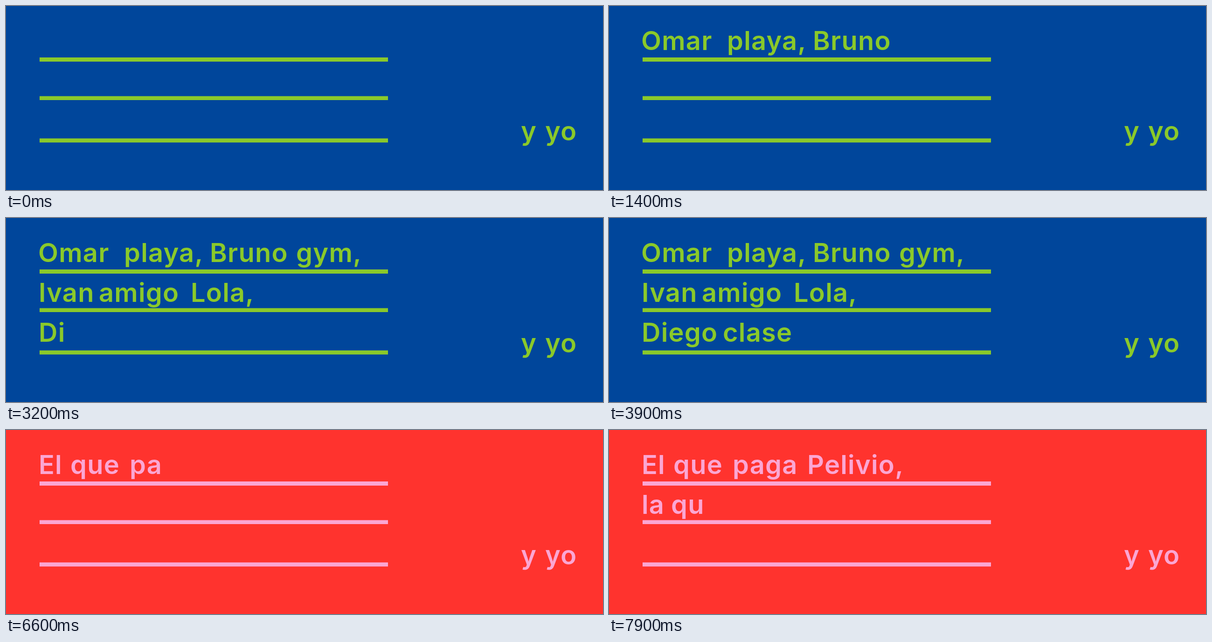
Write an HTML page that moves like this. It is 1280 px wide and 397 px high and loops after 8000 ms.

```html
<!DOCTYPE html>
<html lang="es">
<head>
<meta charset="utf-8">
<title>Lista</title>
<style>
  html, body { margin: 0; width: 100%; height: 100%; overflow: hidden; }
  svg { display: block; width: 100%; height: 100%; fill: currentColor; }
  text { font: 600 56px Inter, "Open Sans", sans-serif; letter-spacing: 1.2px; }
</style>
</head>
<body>
<svg id="stage" viewBox="0 0 1280 397">
  <rect x="72" y="111" width="747" height="9"/>
  <rect x="72" y="194.5" width="747" height="8.5"/>
  <rect x="72" y="285.7" width="747" height="8.8"/>
  <g id="words"></g>
  <text x="1104" y="290">y</text>
  <text x="1156" y="290">yo</text>
</svg>
<script>
const LOOP = 8000;
const STEP = 100;

// Each word: left edge, baseline, text. One blank is typed between words.
const scenes = [
  {
    start: 0, back: '#00469b', ink: '#8ac92a',
    words: [
      [69, 95, 'Omar'], [253, 95, 'playa,'], [437, 95, 'Bruno'], [622, 95, 'gym,'],
      [70, 181, 'Ivan'], [199, 181, 'amigo'], [396, 181, 'Lola,'],
      [70, 267, 'Diego'], [244, 267, 'clase']
    ]
  },
  {
    start: 5900, back: '#ff332e', ink: '#fba6d3',
    words: [
      [70, 95, 'El'], [138, 95, 'que'], [265, 95, 'paga'], [425, 95, 'Pelivio,'],
      [70, 181, 'la'], [133, 181, 'qu']
    ]
  }
];

const stage = document.getElementById('stage');
const group = document.getElementById('words');

for (const scene of scenes) {
  let offset = 0;
  scene.items = scene.words.map(([x, y, text]) => {
    const node = document.createElementNS('http://www.w3.org/2000/svg', 'text');
    node.setAttribute('x', x);
    node.setAttribute('y', y);
    group.append(node);
    const item = { node, text, offset };
    offset += text.length + 1;
    return item;
  });
}

function draw(time) {
  const now = time % LOOP;
  const current = now < scenes[1].start ? scenes[0] : scenes[1];
  const steps = Math.floor((now - current.start) / STEP);
  const typed = Math.floor(steps * 1.31 + 0.42);

  stage.style.background = current.back;
  stage.style.color = current.ink;
  for (const scene of scenes) {
    for (const { node, text, offset } of scene.items) {
      const shown = scene === current ? text.slice(0, Math.max(0, typed - offset)) : '';
      if (node.textContent !== shown) node.textContent = shown;
    }
  }
}

const begin = performance.now();
function tick() {
  draw(performance.now() - begin);
  requestAnimationFrame(tick);
}
tick();
</script>
</body>
</html>
```
